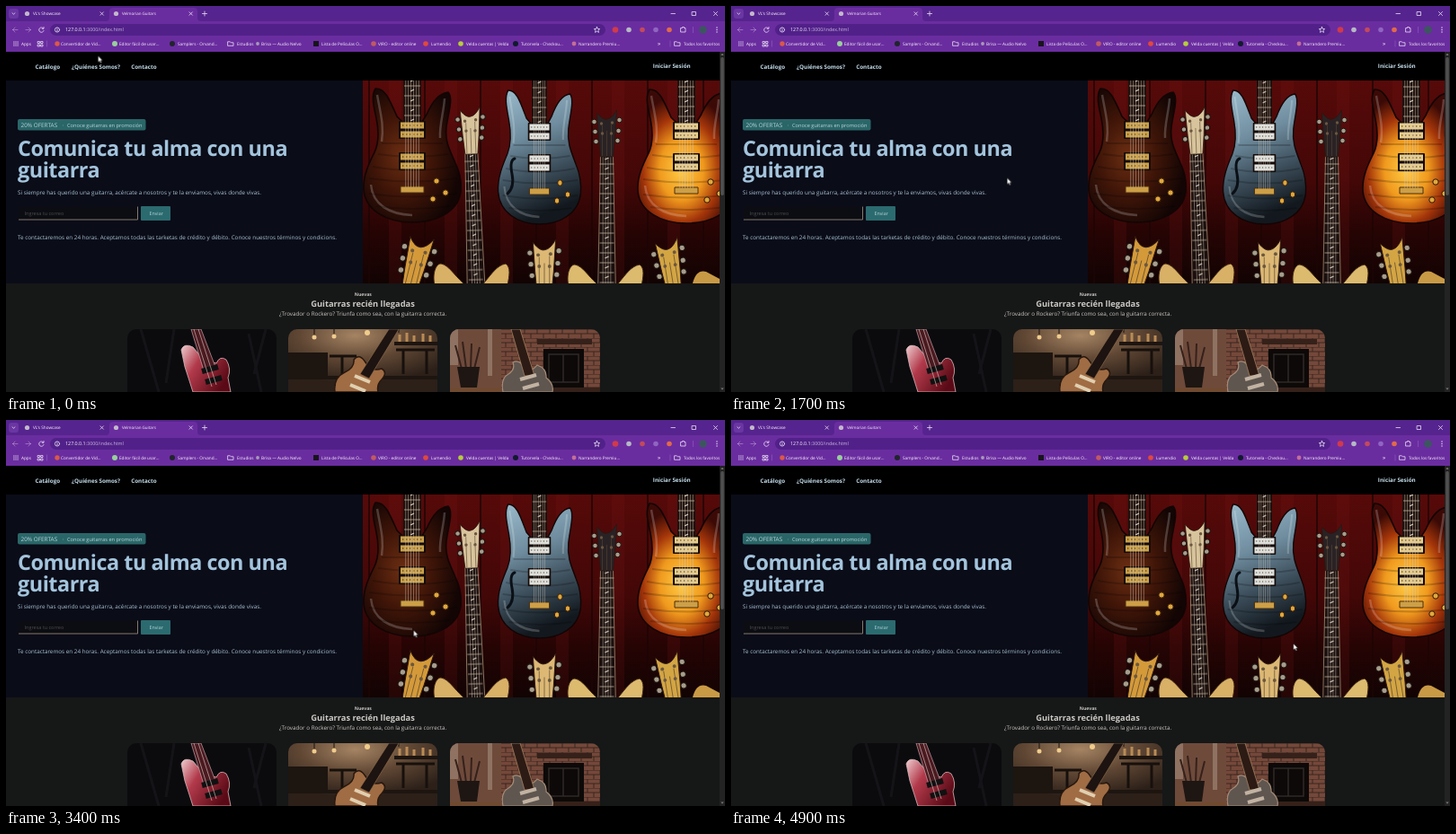
Recreate the animation shown at these times as an HTML page. Size 800x430 px, loop 5 s.

```html
<!DOCTYPE html>
<html lang="es">
<head>
<meta charset="utf-8">
<title>Guitarras</title>
<style>
html, body { margin: 0; width: 100%; height: 100%; overflow: hidden; background: #151515; }
svg { display: block; width: 800px; height: 430px; }
text { font-family: "Open Sans", "Noto Sans", sans-serif; text-rendering: geometricPrecision; white-space: pre; }
.chrome { font-size: 4.7px; fill: #fbf6ff; }
.line { fill: none; stroke: #e8def4; stroke-width: .8; stroke-linecap: round; stroke-linejoin: round; }
.dim { opacity: .45; }
.nav { font-size: 6.3px; font-weight: 700; fill: #c3dcea; }
.copy { font-size: 6.32px; fill: #a9c3d3; }
.title { font-size: 23.4px; font-weight: 700; letter-spacing: -.47px; fill: #a3c4dc; }
.mid { text-anchor: middle; fill: #cbc9c4; }

.cursor { animation: travel 5s infinite; }
@keyframes travel {
  0%   { transform: translate(102.5px, 55.5px); animation-timing-function: steps(5, end); }
  10%  { transform: translate(224px, 145px); animation-timing-function: steps(4, end); }
  18%  { transform: translate(297px, 197px); animation-timing-function: steps(8, end); }
  34%  { transform: translate(307.3px, 191.5px); animation-timing-function: steps(5, end); }
  44%  { transform: translate(321px, 202.5px); animation-timing-function: steps(7, end); }
  58%  { transform: translate(398.7px, 239.7px); animation-timing-function: step-end; }
  64%  { transform: translate(398.7px, 239.7px); animation-timing-function: steps(8, start); }
  80%  { transform: translate(545px, 225px); animation-timing-function: step-end; }
  82%  { transform: translate(545px, 225px); animation-timing-function: steps(9, start); }
  100% { transform: translate(625.7px, 249px); }
}
</style>
</head>
<body>
<svg viewBox="0 0 800 430" xmlns="http://www.w3.org/2000/svg">
<defs>
  <linearGradient id="wall" x2="0" y2="1">
    <stop offset="0" stop-color="#560a09"/><stop offset=".5" stop-color="#430707"/><stop offset=".75" stop-color="#260404"/><stop offset="1" stop-color="#120303"/>
  </linearGradient>
  <radialGradient id="walnut" cx=".4" cy=".5" r=".6">
    <stop offset="0" stop-color="#6b2e12"/><stop offset=".5" stop-color="#3f1508"/><stop offset="1" stop-color="#120504"/>
  </radialGradient>
  <linearGradient id="steel" x2=".25" y2="1">
    <stop offset="0" stop-color="#9cbccc"/><stop offset=".4" stop-color="#6f8d9f"/><stop offset=".7" stop-color="#3d4f5c"/><stop offset="1" stop-color="#12181e"/>
  </linearGradient>
  <radialGradient id="burst" cx=".45" cy=".6" r=".56">
    <stop offset="0" stop-color="#ffcb45"/><stop offset=".4" stop-color="#f09a1e"/><stop offset=".7" stop-color="#a5360a"/><stop offset="1" stop-color="#3c0a06"/>
  </radialGradient>
  <radialGradient id="bar" cx=".45" cy=".1" r=".75">
    <stop offset="0" stop-color="#a58463"/><stop offset=".5" stop-color="#604734"/><stop offset="1" stop-color="#2c2019"/>
  </radialGradient>
  <linearGradient id="cherry" x2="1" y2=".6">
    <stop offset="0" stop-color="#efcdd0"/><stop offset=".4" stop-color="#b23a4b"/><stop offset="1" stop-color="#5a0a16"/>
  </linearGradient>
  <pattern id="boards" width="62" height="230" x="403" patternUnits="userSpaceOnUse">
    <path d="M1 0V230" stroke="#1c0303" stroke-width="1.500"/><path d="M30 0V230" stroke="#7d1613" stroke-width="14" opacity=".18"/>
  </pattern>
  <pattern id="frets" width="18" height="11" x="-9" patternUnits="userSpaceOnUse">
    <path d="M0 1H18" stroke="#b9a894" stroke-width=".8"/><path d="M7 7l4-2" stroke="#ded6c8" stroke-width="1.2"/>
  </pattern>
  <pattern id="strings" width="2.9" height="9" x="-8.7" patternUnits="userSpaceOnUse">
    <path d="M1.45 0V9" stroke="#d8cbb8" stroke-width=".45"/>
  </pattern>
  <pattern id="brick" width="14" height="10" y="360" patternUnits="userSpaceOnUse">
    <path d="M0 0H14M0 5H14M3 0V5M10 5V10" stroke="#33201a" stroke-width=".9"/>
  </pattern>

  <g id="pickup">
    <rect x="-15" y="-10" width="30" height="20" rx="1" fill="#140b08"/>
    <path d="M-13-5H13M-13 5H13" stroke="currentColor" stroke-width="7"/>
    <path d="M-11-5H11M-11 5H11" stroke="#3a2613" stroke-width="1" stroke-dasharray="1.4 2.6"/>
  </g>
  <g id="guitar">
    <path stroke="#120504" stroke-width="1.6" d="M-41-73C-30-74-25-60-17-42L-11-36H11L16-44C22-58 30-68 40-69C46-62 40-46 38-30C36-14 42-4 48 10C53 20 55 30 54 42C51 65 26 76 0 76C-28 76-52 63-54 40C-55 24-48 10-42-2C-37-13-37-26-40-40C-43-54-46-65-41-73Z"/>
    <path fill="none" stroke="#fff" stroke-width="2.500" opacity=".2" d="M-39-66C-36-48-31-32-34-14M36-62C35-46 30-32 31-18M-46 34C-44 56-26 67 0 68"/>
    <path fill="none" stroke="#000" stroke-width="2" opacity=".2" d="M-34-12H34M-38 0Q0 6 40 0M-44 14Q0 22 46 14M-48 27Q0 34 50 27M-48 44Q0 51 50 44M-40 58Q0 64 42 58"/>
    <rect x="-10" y="-85" width="20" height="49" fill="#1d100c"/>
    <rect x="-9" y="-85" width="18" height="49" fill="url(#frets)"/>
    <use href="#pickup" y="-27"/><use href="#pickup" y="8"/>
    <path d="M-13 36H13V43H-13Z" fill="#cda047" stroke="#4b2d0d"/>
    <g fill="#e0a83c" stroke="#2c1407"><circle cx="27" cy="30" r="3.2"/><circle cx="37" cy="43" r="3.2"/><circle cx="23" cy="50" r="3.2"/></g>
    <rect x="-8.7" y="-85" width="17.4" height="122" fill="url(#strings)"/>
  </g>
  <g id="head">
    <g fill="#a79d8c" stroke="#1b130f">
      <circle cx="-14" cy="-13" r="2.800"/><circle cx="-13" cy="-2" r="2.800"/><circle cx="-12" cy="9" r="2.800"/>
      <circle cx="14" cy="-15" r="2.800"/><circle cx="13" cy="-3" r="2.800"/><circle cx="12" cy="8" r="2.800"/>
    </g>
    <path stroke="#2b1710" stroke-width=".8" d="M-11-23Q-4-14 1-16Q6-17 11-26L9 5 7 26H-7L-9 5Z"/>
    <path d="M-5-9V25M0-3V25M5-10V25" stroke="#584630" stroke-width=".6"/>
    <g fill="#6b573f"><circle cx="-6" cy="-11" r="1.7"/><circle cx="-5" cy="0" r="1.7"/><circle cx="6" cy="-12" r="1.7"/><circle cx="5" cy="0" r="1.7"/></g>
  </g>
  <g id="neck">
    <path d="M-7 25H7L10 180H-10Z" fill="#1a0f0d" stroke="#a58c72" stroke-width=".8"/>
    <rect x="-8" y="27" width="16" height="153" fill="url(#frets)"/>
    <rect x="-5.8" y="25" width="11.6" height="155" fill="url(#strings)"/>
    <use href="#head"/>
  </g>
  <path id="horns" stroke="#3b2410" d="M-43 24C-46 12-42 0-36 0C-27 2-22 12-12 21L-10 24ZM10 24L13 20C20 12 26 2 36 0C42 4 40 14 38 24Z"/>
  <path id="folder" class="line" d="M-3-2.2H-.6L.3-1.2H3V2.3H-3Z"/>

  <clipPath id="photo"><rect x="397" y="83" width="397" height="226"/></clipPath>
  <clipPath id="cards">
    <rect x="135" y="360" width="166" height="90" rx="10"/><rect x="314" y="360" width="166" height="90" rx="10"/><rect x="494" y="360" width="167" height="90" rx="10"/>
  </clipPath>
</defs>

<!-- Browser -->
<rect width="800" height="51" fill="#56248e"/>
<rect x="3" y="3" width="11" height="11" rx="3" fill="#6a36a2"/>
<path class="line" d="M7 7.8L8.5 9.2 10 7.8"/>
<path d="M0 17H111Q115 17 115 13V6Q115 2 119 2H209Q213 2 213 6V13Q213 17 217 17H800V51H0Z" fill="#6a2d9f"/>
<g fill="#c2b8cb"><circle cx="23.500" cy="8.500" r="2.600"/><circle cx="122.500" cy="8.500" r="2.600"/></g>
<g class="chrome">
  <text x="30" y="10.300">VL's Showcase</text>
  <text x="129" y="10.300" font-size="4.5">Velmorian Guitars</text>
</g>
<path class="line" d="M105 6.800l3.400 3.400m0-3.400l-3.400 3.400M204 6.800l3.400 3.400m0-3.400l-3.400 3.400M218.500 8.500h5m-2.500-2.500v5M740 8.500h4.500M763.500 6.500h4v4h-4ZM787.500 6.500l4 4m0-4l-4 4"/>
<rect x="49" y="20" width="618" height="13" rx="6.5" fill="#512189"/>
<g class="line">
  <path class="dim" d="M13 26.500H7.500m2.500-2.500l-2.500 2.500 2.500 2.500M22 26.500h5.500m-2.500-2.500l2.500 2.500-2.500 2.500"/>
  <path d="M41.600 25A2.700 2.700 0 1 0 42 27.500M42 23.500V25.300H40.200"/>
  <circle cx="57" cy="26.500" r="2.600"/><path d="M57 26.300V28M57 25V25.100"/>
  <path d="M657.500 23.300l.9 2.100 2.300.2-1.700 1.500.5 2.300-2-1.200-2 1.200.5-2.300-1.700-1.500 2.300-.2Z"/>
  <path d="M751 24.500H752.500V23.500H754.500V24.500H756V29H751Z"/>
</g>
<circle cx="678" cy="26.500" r="3.300" fill="#d03a4c"/>
<circle cx="693" cy="26.500" r="2.800" fill="#b5b9c4"/>
<circle cx="708" cy="26.500" r="2.800" fill="#c24a5c"/>
<circle cx="723" cy="26.500" r="2.800" fill="#8f65c2"/>
<circle cx="738" cy="26.500" r="2.800" fill="#e16a4a"/>
<path d="M764.500 23V30" stroke="#8c5bbd" stroke-width=".7"/>
<circle cx="775.500" cy="26.500" r="4.300" fill="#3c5660"/>
<g fill="#efe6f8"><circle cx="791" cy="24" r=".7"/><circle cx="791" cy="26.500" r=".7"/><circle cx="791" cy="29" r=".7"/></g>

<path d="M8.300 40h5.400M8.300 42h5.400M8.300 44h5.400" stroke="#e8def4" stroke-width="1.2" stroke-dasharray="1.200 .9"/>
<path class="line" d="M35.500 39.500h2v2h-2zM39 39.500h2v2h-2zM35.500 43h2v2h-2zM39 43h2v2h-2z"/>
<path d="M45.500 38.500V45.500M739 38.500V45.500" stroke="#8c5bbd" stroke-width=".7"/>
<circle cx="57" cy="42" r="2.700" fill="#db5848"/>
<circle cx="121" cy="42" r="3" fill="#98cf9c"/>
<circle cx="185" cy="42" r="3" fill="#20242c"/>
<use href="#folder" x="250" y="42"/>
<circle cx="280" cy="42" r="1.900" fill="#a89ab8"/>
<rect x="342" y="39" width="6" height="6" fill="#17151b"/>
<circle cx="409" cy="42" r="2.800" fill="#c05a62"/>
<circle cx="467" cy="42" r="2.800" fill="#e2483c"/>
<circle cx="506" cy="42" r="2.800" fill="#b7cc3d"/>
<circle cx="567" cy="42" r="3" fill="#101a2c"/>
<circle cx="632" cy="42" r="2.400" fill="#c36f96"/>
<use href="#folder" x="747" y="42"/>
<g class="chrome">
  <text x="66" y="28.400" font-size="5.36">127.0.0.1<tspan fill="#c9b6de">:3000/index.html</tspan></text>
  <text x="17" y="43.700">Apps</text>
  <text x="61" y="43.700">Convertidor de Vid...</text>
  <text x="126" y="43.700">Editor fácil de usar...</text>
  <text x="191" y="43.700">Samplers - Orvand...</text>
  <text x="257" y="43.700">Estudios</text>
  <text x="284" y="43.700">Brisa — Audio Nelvo</text>
  <text x="351" y="43.700">Lista de Películas O...</text>
  <text x="414" y="43.700">VIRO - editor online</text>
  <text x="473" y="43.700">Lumendio</text>
  <text x="512" y="43.700">Velda cuentas | Velda</text>
  <text x="573" y="43.700">Tutorvela - Checkou...</text>
  <text x="637" y="43.700">Narrandero Premiu...</text>
  <text x="725" y="43.700" font-size="6.5">»</text>
  <text x="754" y="43.700" font-size="4.6">Todos los favoritos</text>
</g>

<!-- Page -->
<rect y="51" width="800" height="33" fill="#000"/>
<g class="nav">
  <text x="32.500" y="70.200">Catálogo</text>
  <text x="73" y="70.200">¿Quiénes Somos?</text>
  <text x="139.200" y="70.200">Contacto</text>
  <text x="719.800" y="68.900">Iniciar Sesión</text>
</g>
<rect y="83" width="397" height="226" fill="#0a0c18"/>
<rect x="13" y="126" width="142.500" height="12.500" rx="2" fill="#2a6668"/>
<g fill="#b9d4dc">
  <text x="16.500" y="134.900" font-size="6.4">20% OFERTAS</text>
  <text x="63" y="134.700" font-size="5.7">·</text>
  <text x="68" y="134.700" font-size="5.7">Conoce guitarras en promoción</text>
</g>
<text class="title" x="13" y="166.500">Comunica tu alma con una</text>
<text class="title" x="13" y="190.800">guitarra</text>
<text class="copy" x="13" y="210.300">Si siempre has querido una guitarra, acércate a nosotros y te la enviamos, vivas donde vivas.</text>
<rect x="14" y="223.500" width="133" height="15" fill="#0c0d13"/>
<path d="M14 238H146.500V223.500" fill="none" stroke="#83796a" stroke-width="1"/>
<text x="20.500" y="233" font-size="5.5" fill="#4d4c4b">Ingresa tu correo</text>
<rect x="150" y="223" width="33" height="16" rx="1" fill="#2b6b6f"/>
<text x="159.500" y="233.200" font-size="5.3" fill="#b9d4dc">Enviar</text>
<text class="copy" x="13" y="260.300">Te contactaremos en 24 horas. Aceptamos todas las tarketas de crédito y débito. Conoce nuestros términos y condicions.</text>

<g clip-path="url(#photo)">
  <rect x="397" y="83" width="397" height="226" fill="url(#wall)"/>
  <rect x="397" y="83" width="397" height="226" fill="url(#boards)"/>
  <use href="#guitar" transform="translate(452 165)" fill="url(#walnut)" color="#c9a04a"/>
  <use href="#guitar" transform="translate(593.500 167) scale(.85 1)" fill="url(#steel)" color="#dfe2df"/>
  <path d="M566 170Q560 172 563 187T558 209" fill="none" stroke="#0b1016" stroke-width="3" stroke-linecap="round"/>
  <use href="#guitar" transform="translate(757 166)" fill="url(#burst)" color="#e6cc8c"/>
  <use href="#neck" transform="translate(517 139) rotate(-2)" fill="#d8c49c"/>
  <use href="#neck" transform="translate(668.500 142)" fill="#292225"/>
  <use href="#horns" x="520" y="287" fill="#d8b066"/>
  <use href="#horns" x="669" y="288" fill="#dcba6e"/>
  <use href="#head" transform="translate(456 287) rotate(14) scale(1.200)" fill="#d49a3a"/>
  <use href="#head" transform="translate(599 290) scale(1.150)" fill="#dcb874"/>
  <use href="#head" transform="translate(739 289) rotate(-9) scale(1.150)" fill="#d3a543"/>
  <path d="M764 309Q768 293 779 296L794 304V309Z" fill="#c99a45"/>
</g>

<rect y="309" width="794" height="121" fill="#161717"/>
<g class="mid">
  <text x="397.300" y="323" font-size="5.1" font-weight="700">Nuevas</text>
  <text x="397" y="335.200" font-size="9.3" font-weight="700">Guitarras recién llegadas</text>
  <text x="397" y="344.800" font-size="6.28">¿Trovador o Rockero? Triunfa como sea, con la guitarra correcta.</text>
</g>

<g clip-path="url(#cards)">
  <rect x="135" y="360" width="166" height="70" fill="#0b0b0e"/>
  <path d="M150 360L170 430M187 360L178 420M270 365L284 430M289 360L276 410" stroke="#25252a" stroke-width="3" opacity=".4"/>
  <path d="M195 383Q198 375 208 380Q215 388 219 394L234 398Q238 389 245 394Q251 404 247 414L250 430H208Q203 414 199 402Z" fill="url(#cherry)" stroke="#d9b9bb" stroke-width=".8"/>
  <path d="M206 360H217L233 402 220 406Z" fill="#4a1a20" stroke="#c9a2a6" stroke-width=".7"/>
  <path d="M218 407l18-5M222 419l18-5" stroke="#111" stroke-width="6"/>
  <path d="M209 360L229 424M214 360L234 422" stroke="#e0cfca" stroke-width=".6"/>

  <rect x="314" y="360" width="166" height="70" fill="url(#bar)"/>
  <path d="M314 386H358V416H314ZM432 374H480V378H432ZM318 412H480V416H318Z" fill="#1d1510"/>
  <path d="M434 383H477M442 383V410M468 383V410M360 390H390M374 390V426M366 426H383" stroke="#17100c" stroke-width="3"/>
  <path d="M438 374V366M446 374V364M454 374V367M464 374V365M472 374V367" stroke="#b98b55" stroke-width="3"/>
  <path d="M343 360V367M365 360V366M437 360V364" stroke="#1b120c"/>
  <g fill="#f0cc8c"><circle cx="343" cy="369" r="2.500"/><circle cx="365" cy="368" r="2.500"/><circle cx="402" cy="364" r="3"/></g>
  <path d="M366 430Q364 414 377 408Q388 403 387 394Q393 386 400 397Q407 408 418 404Q425 408 418 416Q412 422 414 430Z" fill="#a06c44" stroke="#28180e" stroke-width="1.500"/>
  <path d="M394 410L426 360H437L404 415Z" fill="#1d1310" stroke="#94714f" stroke-width=".6"/>
  <path d="M388 412l17 7M383 422l17 7" stroke="#e0cfb0" stroke-width="4"/>

  <rect x="494" y="360" width="167" height="70" fill="#74483a"/>
  <rect x="494" y="360" width="167" height="70" fill="url(#brick)"/>
  <path d="M494 360H551V430H494Z" fill="#6e4a3b"/>
  <path d="M494 360H503V400H494ZM536 360H541V412H536Z" fill="#8f7261"/>
  <path d="M591 371H652V377H591ZM586 425H661V430H586Z" fill="#352119"/>
  <rect x="598" y="382" width="45" height="43" fill="#0c0908"/>
  <path d="M604 388H637V419H604ZM620 388V419" fill="none" stroke="#2f2a27" stroke-width="1.500"/>
  <path d="M507 404L500 378M512 404L508 374M517 404L518 376M521 404L527 380" stroke="#35211a" stroke-width="2"/>
  <path d="M502 402H527L524 425H506Z" fill="#1d1613"/>
  <path d="M494 425H550V430H494Z" fill="#704a30"/>
  <path d="M553 430Q550 415 559 410Q567 405 564 397Q571 393 577 403Q584 409 591 400Q602 404 601 414Q610 421 608 430Z" fill="#5f5650" stroke="#a58b76" stroke-width="1.200"/>
  <path d="M562 360H572L588 412H577Z" fill="#2c1b14" stroke="#b18a67" stroke-width=".7"/>
  <path d="M572 416l18-5M575 426l18-5" stroke="#c2b2a2" stroke-width="4"/>
</g>

<rect x="794" y="51" width="6" height="379" fill="#232323"/>
<rect x="795.200" y="57" width="3.600" height="154" rx="1.800" fill="#505050"/>
<path d="M795.300 55L797 52.700 798.700 55ZM795.300 425.500L797 427.800 798.700 425.500Z" fill="#777"/>

<g class="cursor"><path d="M0 0V7.200L1.700 5.700 2.800 8.200 4 7.700 2.900 5.200H5Z" fill="#fff" stroke="#000" stroke-width=".45"/></g>
</svg>
</body>
</html>
```
